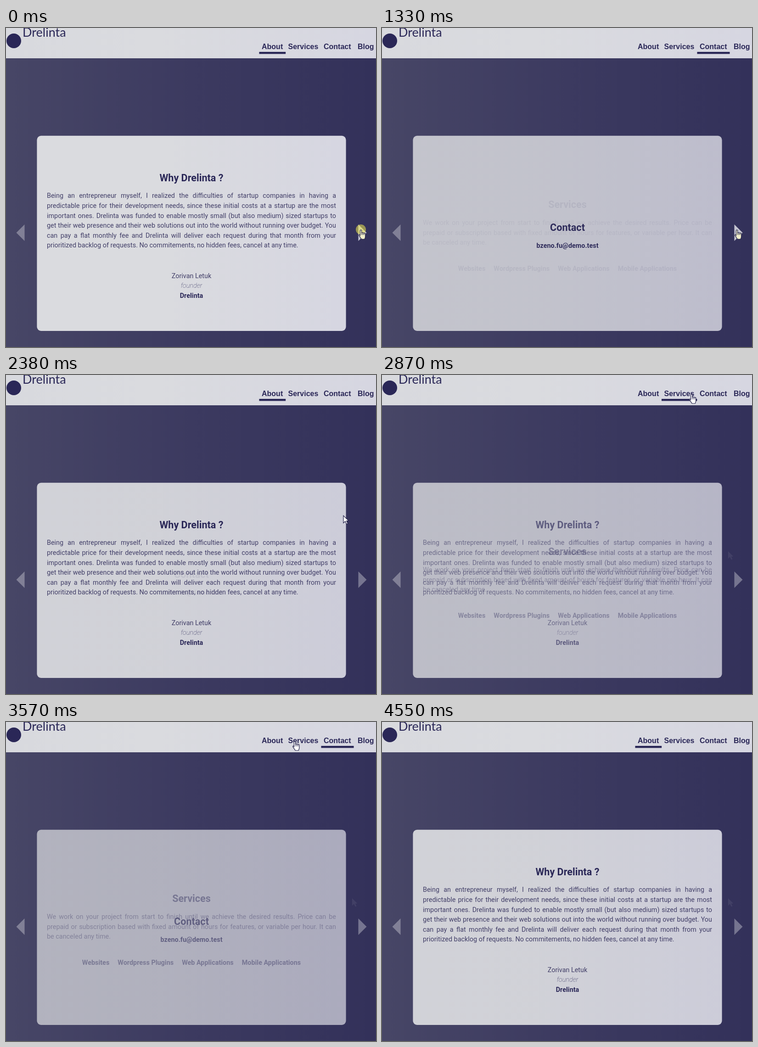
Recreate the animation shown at these times as an HTML page. Size 806 px wide and 695 px high, loop 4830 ms.

```html
<!DOCTYPE html>
<html lang="en">
<head>
<meta charset="utf-8">
<style>
  html, body { margin: 0; width: 100%; height: 100%; overflow: hidden; }
  body {
    position: relative; color: #2a2757;
    background: linear-gradient(to right, #474666, #3c3a60 50%, #33315a);
    font: 14.4px/21.6px Roboto, sans-serif;
  }
  header {
    position: absolute; width: 100%; height: 66px;
    background: linear-gradient(to right, #d8d9de, #dadbdf 40%, #d6d6e1);
  }
  svg { position: absolute; left: 0; top: 0; }
  .slide {
    position: absolute; left: 89px; top: 240.1px; width: 630px; height: 425px;
    display: flex; flex-direction: column; justify-content: center; text-align: center;
  }
  h2 { margin: 0 0 12.4px; font-size: 21.6px; line-height: 32.4px; }
  p { margin: 0; text-align: justify; }
  p, .name { color: #423f68; }
  .name { margin-top: 45px; }
  .list { margin-top: 35.7px; }
  .list b { margin: 0 9px; }
  i { font-weight: 200; }
</style>
</head>
<body>
<header></header>
<svg width="806" height="695" fill="#2a2757">
  <defs>
    <linearGradient id="paper">
      <stop stop-color="#dadbdf"/><stop offset=".4" stop-color="#dadbdf"/><stop offset="1" stop-color="#d6d6e1"/>
    </linearGradient>
  </defs>
  <circle cx="17" cy="28" r="16"/>
  <text x="36" y="19" font-family="Lato, sans-serif" font-size="27">Drelinta</text>
  <g id="nav" font-family="Liberation Sans, Arial, sans-serif" font-size="16" font-weight="bold">
    <text x="557" y="46">About</text>
    <text x="614.5" y="46">Services</text>
    <text x="692" y="46">Contact</text>
    <text x="766" y="46">Blog</text>
  </g>
  <rect id="bar" y="52" height="4.5"/>
  <rect id="card" x="67.4" y="234.8" width="673.2" height="425.2" rx="9" fill="url(#paper)"/>
  <path d="M40.5 428V464L22.5 446Z" fill="#dadae2" opacity=".4"/>
  <path id="next" d="M767.5 428V464L785.5 446Z" fill="#dadae2"/>
</svg>

<div class="slide">
  <h2>Why Drelinta ?</h2>
  <p>Being an entrepreneur myself, I realized the difficulties of startup companies in having a
    predictable price for their development needs, since these initial costs at a startup are the most
    important ones. Drelinta was funded to enable mostly small (but also medium) sized startups to
    get their web presence and their web solutions out into the world without running over budget. You
    can pay a flat monthly fee and Drelinta will deliver each request during that month from your
    prioritized backlog of requests. No commitements, no hidden fees, cancel at any time.</p>
  <div class="name">Zorivan Letuk</div>
  <i>founder</i>
  <b>Drelinta</b>
</div>
<div class="slide">
  <h2>Services</h2>
  <p>We work on your project from start to finish until we achieve the desired results. Price can be
    prepaid or subscription based with fixed amount of hours for features, or variable per hour. It can
    be canceled any time.</p>
  <div class="list"><b>Websites</b><b>Wordpress Plugins</b><b>Web Applications</b><b>Mobile Applications</b></div>
</div>
<div class="slide">
  <h2>Contact</h2>
  <b>bzeno.fu@demo.test</b>
</div>

<svg width="806" height="695">
  <defs>
    <path id="arrow" d="M0 0V16L4 12.5L7 18.5L9.5 17.2L6.7 11.5H11.5Z"/>
    <path id="hand" d="M3.5 13V2.5a1.6 1.6 0 0 1 3.2 0V8a1.5 1.5 0 0 1 2.8-.2a1.5 1.5 0 0 1 2.7.7a1.4 1.4 0 0 1 2.6 1V15c0 3-1 4-1.6 6H6.2C5 18 2 15.5 .8 12.8c-.5-1.7 1-2.2 1.8-1.2Z"/>
  </defs>
  <use id="trace" href="#arrow" x="754" y="384" fill="#fff" opacity=".07"/>
  <g id="cursor">
    <circle id="halo" cx="5" r="11" fill="#f0eb50" opacity=".55"/>
    <use id="shape" stroke="#24224a" stroke-width="1.2"/>
    <path id="lines" d="M6.7 8V12M9.5 8.5V12M12.2 9.5V12" stroke="#24224a"/>
  </g>
</svg>

<script>
const LOOP = 4830, STEP = 70, FADE = 500;
const $ = id => document.getElementById(id);
const slides = document.querySelectorAll('.slide');
const tabs = $('nav').children;

// Every start fades to the next slide in turn
const starts = [30, 880, 1780, 2665, 3290, 3870];
// Cursor stops: time, x, y
const stops = [[0, 768, 439], [2240, 768, 439], [2660, 669, 41], [2870, 669, 41],
  [3220, 704, 41], [3745, 584, 41], [3920, 584, 41], [4550, 760, 700]];

function cursorAt(t) {
  const i = stops.findIndex(s => s[0] > t);
  if (i < 0) return stops[stops.length - 1].slice(1);
  const [t0, x0, y0] = stops[i - 1], [t1, x1, y1] = stops[i];
  const k = (t - t0) / (t1 - t0);
  return [x0 + (x1 - x0) * k, y0 + (y1 - y0) * k];
}

function smooth(x) {
  x = Math.min(1, Math.max(0, x));
  return x * x * (3 - 2 * x);
}

function show(id, on) {
  $(id).style.display = on ? '' : 'none';
}

function draw(t) {
  const n = starts.filter(s => s <= t).length;
  const now = n % 3, old = (n + 2) % 3;
  const age = n ? t - starts[n - 1] : LOOP;
  const p = smooth(age / FADE);
  const left = Math.max(1 - p, age < 670 ? .08 : 0);
  slides.forEach((el, i) => el.style.opacity = i === now ? p : i === old ? left : 0);

  // The card dips while two half-clear sheets overlap, slightly behind the text
  const q = smooth((age - 60) / FADE);
  $('card').setAttribute('opacity', 1 - .06 * smooth(t / FADE) - .85 * q * (1 - q));

  $('bar').setAttribute('x', tabs[now].getAttribute('x') - 5.5);
  $('bar').setAttribute('width', tabs[now].getComputedTextLength() + 11.5);

  const [x, y] = cursorAt(t);
  const onNext = t <= 2240, hand = onNext || y < 52;
  $('next').setAttribute('opacity', onNext ? .87 : .4);
  $('cursor').setAttribute('transform', `translate(${x} ${y})`);
  $('shape').setAttribute('href', hand ? '#hand' : '#arrow');
  $('shape').setAttribute('fill', onNext ? '#f1efcb' : '#fff');
  show('cursor', t < 4550);
  show('lines', hand);
  show('halo', starts.some(s => t >= s - 110 && t < s + 30));
  show('trace', t > 2380);
}

const t0 = performance.now();
function tick() {
  const t = (performance.now() - t0) % LOOP;
  draw(Math.floor(t / STEP) * STEP);
  requestAnimationFrame(tick);
}
tick();
</script>
</body>
</html>
```
